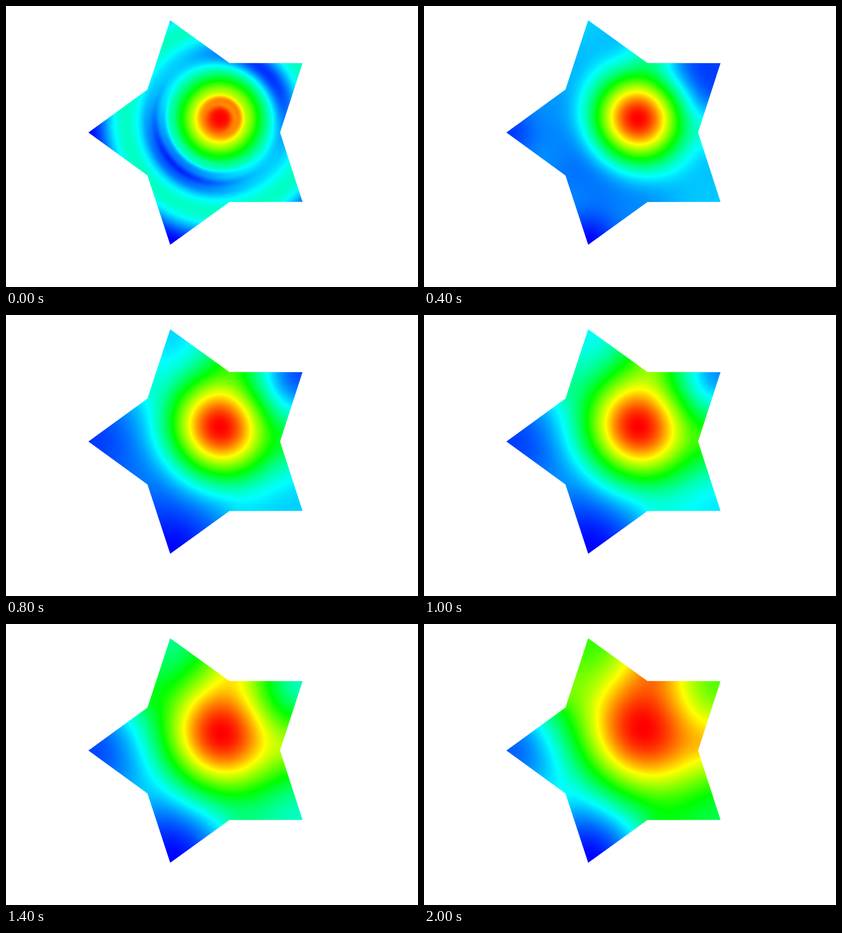
These frames come from a looping animation (905x619 px, 2200 ms). A matplotlib script:

```python
import numpy as np
import matplotlib.pyplot as plt
from matplotlib.animation import FuncAnimation
from matplotlib.colors import LinearSegmentedColormap
from matplotlib.patches import Polygon
from matplotlib.path import Path

W, H, DPI = 905, 619, 100
FRAMES, INTERVAL = 11, 200
CELL = 3              # grid spacing in pixels
SPREAD = 3.0          # diffusivity, square pixels per ms
SUBSTEPS = 320        # solver steps per frame
CENTRE = 441, 278.7
SOURCE = 469, 248     # middle of the hot spot

# ten-cornered star, starting at the right-hand notch
corner = np.arange(10)
angle = np.radians(36) * corner
radius = np.where(corner % 2, 260, 161)
STAR = np.column_stack([CENTRE[0] + radius * np.cos(angle),
                        CENTRE[1] - radius * np.sin(angle)])

X0, X1, Y0, Y1 = 168, 666, 18, 540
gx, gy = np.meshgrid(np.arange(X0, X1, CELL) + CELL / 2,
                     np.arange(Y0, Y1, CELL) + CELL / 2)
inside = Path(STAR).contains_points(
    np.column_stack([gx.ravel(), gy.ravel()])).reshape(gx.shape)
open_x = inside[:, 1:] & inside[:, :-1]
open_y = inside[1:] & inside[:-1]


def bell(r, middle, width):
    return np.exp(-((r - middle) / width) ** 2)


def wave(r, crest, length):
    return np.cos(2 * np.pi * (r - crest) / length)


def first_heat():
    """Gaussian hot spot with rings around it."""
    dx, dy = gx - SOURCE[0], gy - SOURCE[1]
    r = np.hypot(dx, dy) + 1e-9
    northeast = (dx - dy) / (np.sqrt(2) * r)
    spot = np.exp(-r ** 2 / 7800)
    rings = .18 * wave(r, 207, 170) / (1 + np.exp((125 - r) / 12))
    trough = -.09 * (2 * northeast ** 2 - 1) * bell(r, 142, 30)
    core = .06 * wave(r, 44, 30) * bell(r, 40, 20) * (1 + northeast) / 2
    ripples = .03 * wave(r, 0, 22) * bell(r, 120, 35) * np.clip(-northeast, 0, 1)
    return (spot + rings + trough + core + ripples) * inside


def diffuse(u):
    """Advance the heat by one frame; nothing leaks through the edge."""
    u = u.copy()
    rate = SPREAD * INTERVAL / CELL ** 2 / SUBSTEPS
    for _ in range(SUBSTEPS):
        flow_x = rate * np.diff(u, axis=1) * open_x
        flow_y = rate * np.diff(u, axis=0) * open_y
        u[:, :-1] += flow_x
        u[:, 1:] -= flow_x
        u[:-1] += flow_y
        u[1:] -= flow_y
    return u


def neighbours(a):
    return sum(np.roll(a, d, axis) for d in (-1, 1) for axis in (0, 1))


def scaled(u):
    """Stretch to 0..1 and carry the rim values a little outwards."""
    low, high = u[inside].min(), u[inside].max()
    v = np.where(inside, (u - low) / (high - low), 0)
    known = inside.copy()
    for _ in range(3):
        count = neighbours(known.astype(float))
        rim = ~known & (count > 0)
        v[rim] = (neighbours(v)[rim]) / count[rim]
        known |= rim
    return v


fields = [first_heat()]
while len(fields) < FRAMES:
    fields.append(diffuse(fields[-1]))
fields = [scaled(u) for u in fields]

heat_map = LinearSegmentedColormap.from_list(
    "heat", ["blue", "cyan", "lime", "yellow", "red"], N=1024)

fig = plt.figure(figsize=(W / DPI, H / DPI), dpi=DPI, facecolor="white")
ax = fig.add_axes([0, 0, 1, 1])
image = ax.imshow(fields[0], extent=(X0, X1, Y1, Y0), cmap=heat_map,
                  vmin=0, vmax=1, interpolation="bilinear",
                  interpolation_stage="data", aspect="auto")
ax.set_xlim(0, W)
ax.set_ylim(H, 0)
ax.axis("off")
image.set_clip_path(Polygon(STAR, closed=True, transform=ax.transData))


def draw(i):
    image.set_data(fields[i])
    return [image]


anim = FuncAnimation(fig, draw, frames=FRAMES, interval=INTERVAL, repeat=True,
                     repeat_delay=0)
plt.show()
```
